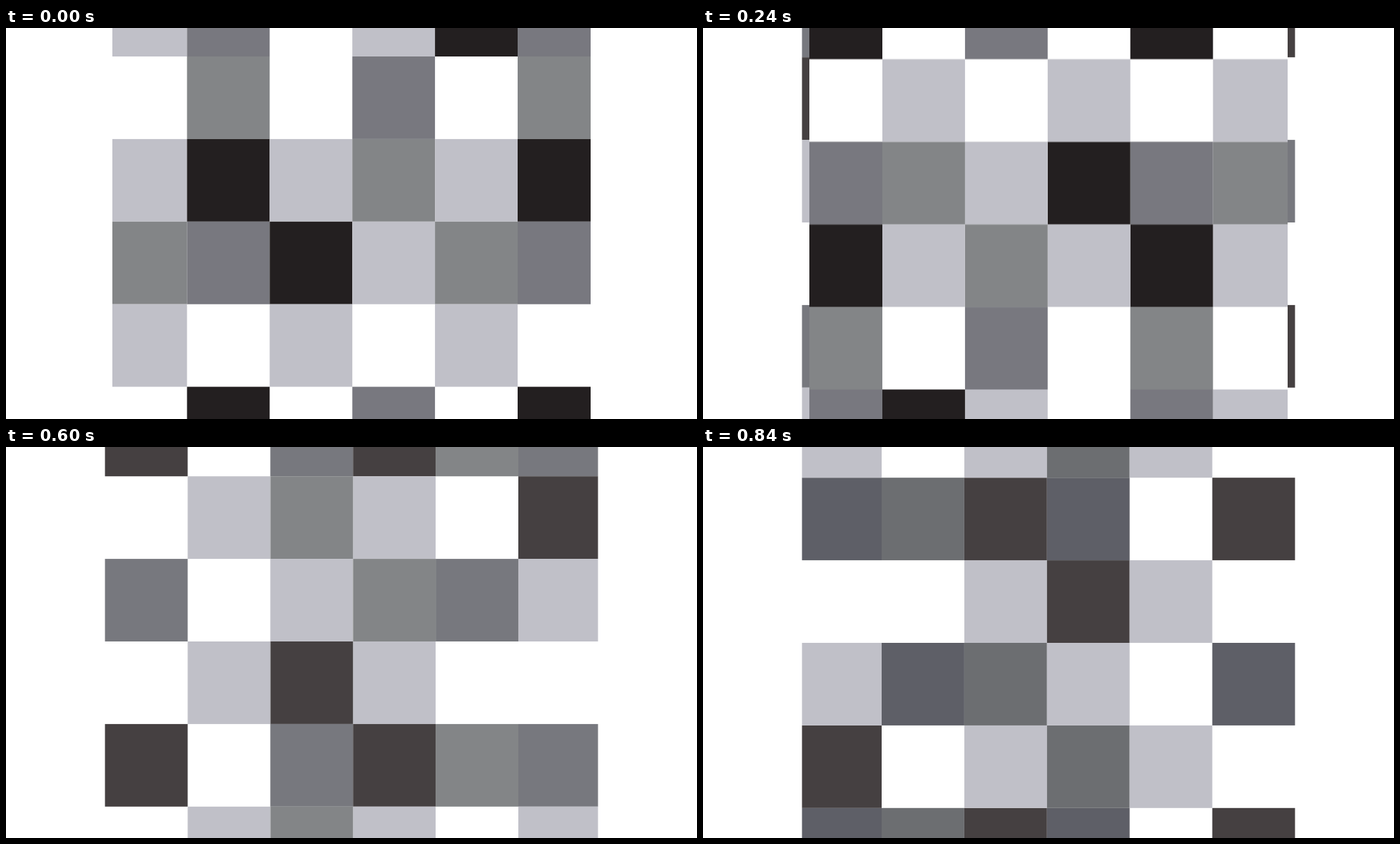
An HTML page for the animation above (960 ms loop, 994 px wide and 563 px high).

```html
<!DOCTYPE html>
<html lang="en">
<head>
<meta charset="utf-8">
<title>Turning checks</title>
<style>
  html, body { margin: 0; width: 100%; height: 100%; overflow: hidden; background: #fff; }
  svg { display: block; width: 100vw; height: 100vh; }
  .rest, .turn { opacity: 0; animation: rest 960ms step-end infinite; }
  .turn { animation-name: turn; }
  .K { fill: #231f20; }
  .D { fill: #78787f; }
  .G { fill: #838587; }
  .L { fill: #c0c0c8; }
  .turn .K { fill: #454041; }
  .turn .D { fill: #77787e; }
  .deep .D { fill: #5e5f67; }
  .deep .G { fill: #6c6e71; }
  @keyframes rest { 0% { opacity: 1; } 12.5%, 100% { opacity: 0; } }
  /* Stays one beat longer, showing at the sides of the next rest pose. */
  @keyframes turn { 0% { opacity: 1; } 25%, 100% { opacity: 0; } }
</style>
</head>
<body>
<svg id="stage" viewBox="0 0 994 563"></svg>
<script>
  const NS = 'http://www.w3.org/2000/svg';
  const CELL = 118.9, BEAT = 120, LOOP = 960;
  const stage = document.getElementById('stage');

  const poses = {
    rest: {
      left: 153, right: 841, x: 260.4, y: 41, flip: 561.5,
      rows: ['LDWLKD', 'WGWDWG', 'LKLGLK', 'GDKLGD', 'LWLWLW', 'WKWDWK']
    },
    turn: {
      left: 142.4, right: 851.6, x: 257, y: 42.2, flip: 562,
      rows: ['DGKDWK', 'KWLGLW', 'LDGLWD', 'WWLKLW', 'DGKDWK', 'LWLGLW']
    }
  };

  function add(parent, tag, attrs) {
    const el = document.createElementNS(NS, tag);
    for (const name in attrs) el.setAttribute(name, attrs[name]);
    return parent.appendChild(el);
  }

  function addRect(parent, x, y, width, height, attrs) {
    add(parent, 'rect', { x, y, width, height, ...attrs });
  }

  function addPose(kind, beat, mirrored, flipped) {
    const p = poses[kind];
    const deep = kind === 'turn' && beat % 4 === 3;
    const sx = mirrored ? -1 : 1, sy = flipped ? -1 : 1;
    const g = add(stage, 'g', {
      class: deep ? 'turn deep' : kind,
      transform: `matrix(${sx} 0 0 ${sy} ${mirrored ? 994 : 0} ${flipped ? p.flip : 0})`,
      style: `animation-delay: ${beat * BEAT - LOOP}ms`
    });

    // The first pose wipes the whole stage.
    const left = beat ? p.left : 0, right = beat ? p.right : 994;
    addRect(g, left, -90, right - left, 740, { fill: '#fff' });

    p.rows.forEach((row, r) => [...row].forEach((tone, c) => {
      if (tone === 'W') return;
      const x0 = c === 0 ? p.left : p.x + (c - 1) * CELL;
      const x1 = c === 5 ? p.right : p.x + c * CELL;
      addRect(g, x0, p.y + (r - 1) * CELL, x1 - x0, CELL, { class: tone });
    }));
  }

  const turns = [[0, 0], [1, 1], [1, 0], [0, 1]];
  turns.forEach(([m, f], i) => addPose('turn', 2 * i + 1, m, f));
  turns.forEach(([m, f], i) => addPose('rest', 2 * i, m, f));
</script>
</body>
</html>
```
